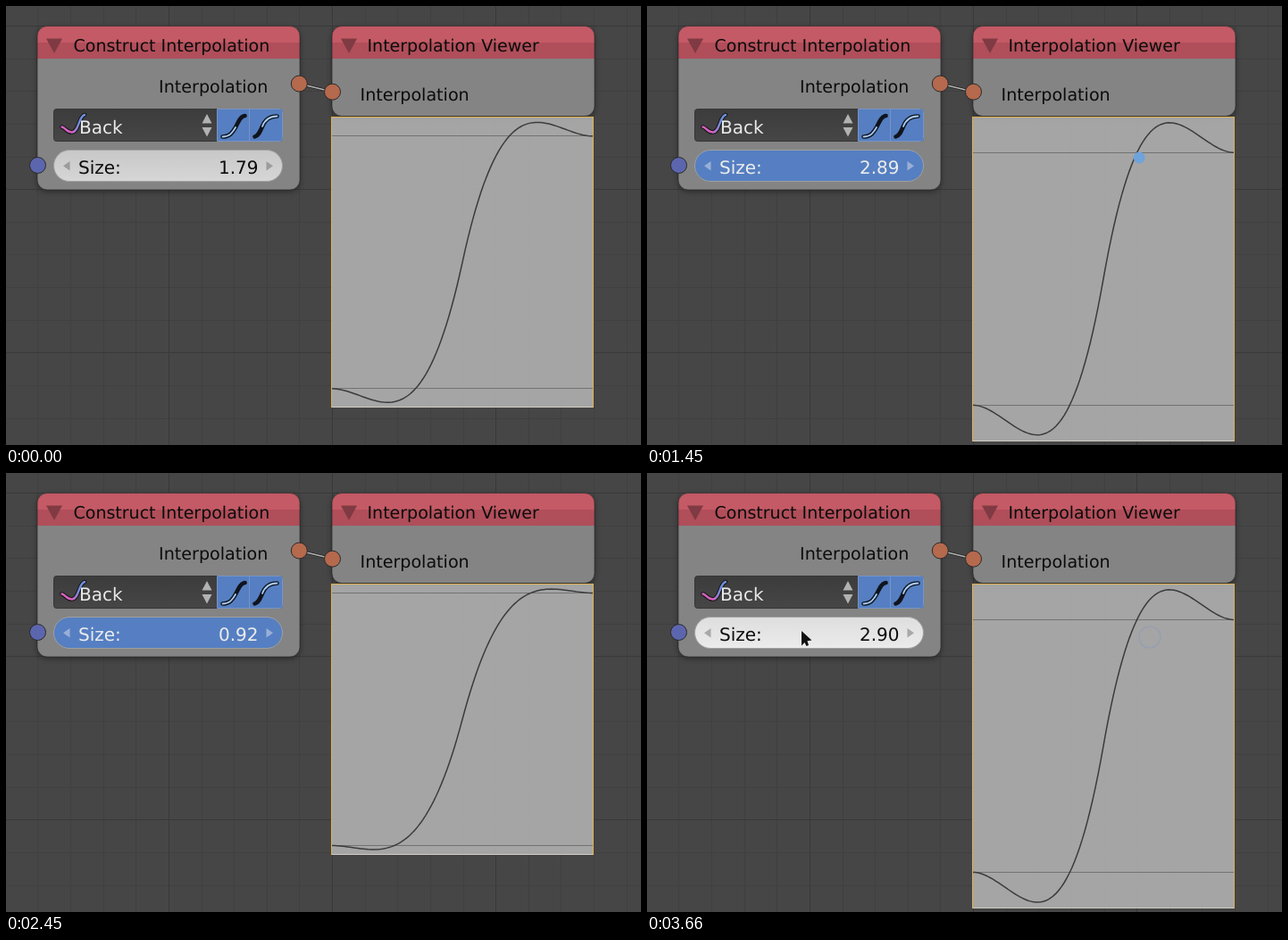
Animation, 711 px wide and 492 px high, one loop 3.7 s. Source, as an HTML page:

```html
<!DOCTYPE html>
<html lang="en">
<head>
<meta charset="utf-8">
<title>Interpolation nodes</title>
<style>
html, body { margin: 0; width: 100%; height: 100%; overflow: hidden; background: #464646; }
svg { display: block; }
text { font-family: "DejaVu Sans", sans-serif; text-rendering: geometricPrecision; fill: #0c0c0c; }
.title { font-size: 19px; }
.label { font-size: 19.1px; }
.field { font-size: 20px; }
.crisp { shape-rendering: crispEdges; }
.icon path { fill: none; stroke-linecap: round; stroke-linejoin: round; }
.socket { stroke: #2a2a2a; stroke-width: 1; }
</style>
</head>
<body>
<svg width="711" height="492" viewBox="0 0 711 492">
  <defs>
    <linearGradient id="idle" x2="0" y2="1"><stop stop-color="#c8c8c8"/><stop offset="1" stop-color="#d6d6d6"/></linearGradient>
    <linearGradient id="hover" x2="0" y2="1"><stop stop-color="#dedede"/><stop offset="1" stop-color="#ebebeb"/></linearGradient>
    <linearGradient id="menu" x2="0" y2="1"><stop stop-color="#3c3c3c"/><stop offset="1" stop-color="#464646"/></linearGradient>
    <linearGradient id="back" x1="61" x2="89" y1="0" y2="0" gradientUnits="userSpaceOnUse">
      <stop offset=".45" stop-color="#d860c0"/><stop offset=".75" stop-color="#6f8fe0"/>
    </linearGradient>
    <filter id="blur" x="-10%" y="-10%" width="120%" height="125%"><feGaussianBlur stdDeviation="3"/></filter>
    <clipPath id="plot"><rect id="plotClip" x="364" y="124" width="294"/></clipPath>
  </defs>

  <g id="grid" class="crisp"></g>
  <g id="nodes"></g>

  <path d="M328 87L365 96" stroke="#222" stroke-width="3"/>
  <path d="M328 87L365 96" stroke="#b4b4b4" stroke-width="1.3"/>
  <g class="socket">
    <circle cx="328.3" cy="87" r="9" fill="#b5694d"/>
    <circle cx="365.5" cy="96.2" r="9" fill="#b5694d"/>
    <circle cx="35.5" cy="178.5" r="9" fill="#5c66ae"/>
  </g>
  <text class="title" x="75.5" y="51">Construct Interpolation</text>
  <text class="title" x="404.5" y="51">Interpolation Viewer</text>
  <text class="label" x="293.3" y="97" text-anchor="end">Interpolation</text>
  <text class="label" x="396.5" y="106">Interpolation</text>

  <rect x="53.5" y="115.5" width="256" height="36" rx="3" fill="url(#menu)" stroke="#363636"/>
  <path d="M236.5 115.5H306.5a3 3 0 0 1 3 3V148.5a3 3 0 0 1 -3 3H236.5Z" fill="#557fc2" stroke="#7894c6"/>
  <path class="crisp" d="M272.5 116V151" stroke="#7894c6"/>
  <path d="M219.5 131.5L225 121L230.5 131.5ZM219.5 136L225 146.5L230.5 136Z" fill="#b2b2b2"/>
  <g id="icons" class="icon"></g>
  <text class="field" x="82" y="143" style="fill:#e9e9e9">Back</text>

  <rect id="panel" x="364" y="124" width="294" fill="#b0b0b0" fill-opacity=".9" class="crisp"/>
  <g clip-path="url(#plot)">
    <path id="levels" class="crisp" stroke="#727272"/>
    <path id="curve" fill="none" stroke="#3b3b3b" stroke-width="1.5"/>
  </g>
  <path id="base" class="crisp" stroke="#d0ccc2"/>
  <path id="frame" class="crisp" fill="none" stroke="#dfb04e"/>
  <circle id="dot" r="6.5"/>
  <circle id="ring" fill="none" stroke="#7f97c6" stroke-width="1.2"/>

  <rect id="slider" x="53.5" y="161.5" width="256" height="35" rx="17.5" stroke="#a0a0a0"/>
  <path id="arrows" d="M64 179.3L71.5 174V184.6ZM299 179.3L291.5 174V184.6Z"/>
  <text class="field caption" x="81" y="188">Size:</text>
  <text class="field caption" id="value" x="282.5" y="188" text-anchor="end"></text>
  <path id="cursor" d="M173 177L184.5 187.5L179.5 188.3L181 193L178.5 194L176.5 190L173 193.5Z" fill="#111" stroke="#f4f4f4" stroke-width=".8" paint-order="stroke"/>
</svg>
<script>
const LOOP = 3700, HOVER = 260, PRESS = 550, RELEASE = 3410, END = 3660;

// Bursts of evenly spaced refreshes: start, end, intervals
const BURSTS = [[0, HOVER, 1], [PRESS, 1040, 7], [1120, 1640, 7], [1720, 2200, 6],
  [2290, 2780, 7], [2860, 3030, 2], [RELEASE, END, 6]];

// Turning points of the drag: time, size, pointer x, pointer y
const DRAG = [
  [PRESS, 1.79, 173, 180], [1120, 2.16, 368, 170], [1610, 3.2, 618, 170], [1880, 2.44, 342, 166],
  [2220, .7, 95, 172], [2430, .92, 190, 178], [2860, 2.82, 545, 185], [3030, 2.9, 563, 184]];

const $ = id => document.getElementById(id);
const set = (id, attrs) => { for (const k in attrs) $(id).setAttribute(k, attrs[k]); };
const show = (id, on) => { $(id).style.display = on ? "" : "none"; };

function lastRefresh(t) {
  const [from, to, n] = BURSTS.filter(b => b[0] <= t).pop();
  const step = (to - from) / n;
  return Math.min(to, from + Math.floor((t - from) / step + 1e-6) * step);
}

// Smooth curve through the turning points that never overshoots them
function dragAt(t, col) {
  const last = DRAG.length - 1;
  if (t <= DRAG[0][0]) return DRAG[0][col];
  if (t >= DRAG[last][0]) return DRAG[last][col];
  const i = DRAG.findIndex(k => k[0] > t) - 1;
  const slope = j => (DRAG[j + 1][col] - DRAG[j][col]) / (DRAG[j + 1][0] - DRAG[j][0]);
  const tangent = j => {
    if (j === 0 || j === last) return 0;
    const a = slope(j - 1), b = slope(j);
    return a * b > 0 ? 2 * a * b / (a + b) : 0;
  };
  const span = DRAG[i + 1][0] - DRAG[i][0], p = (t - DRAG[i][0]) / span, q = 1 - p;
  return DRAG[i][col] * q * q * (1 + 2 * p) + DRAG[i + 1][col] * p * p * (1 + 2 * q) +
    span * p * q * (tangent(i) * q - tangent(i + 1) * p);
}

function drawGrid() {
  const gap = 36.63, lines = ["", ""];
  for (let i = -1; i < 20; i++) {
    const x = Math.round(35.4 + i * gap) + .5, y = Math.round(22 + i * gap) + .5;
    lines[+((i + 1) % 5 === 0)] += `M${x} 0V492`;
    lines[+(i % 5 === 0)] += `M0 ${y}H711`;
  }
  $("grid").innerHTML = ["#404040", "#393939"]
    .map((c, i) => `<path d="${lines[i]}" stroke="${c}"/>`).join("");
}

function node(x, bottom) {
  const y = 22.5, w = 294, r = 11;
  const cap = `M${x} 41V${y + r}a${r} ${r} 0 0 1 ${r} ${-r}h${w - 2 * r}a${r} ${r} 0 0 1 ${r} ${r}V41Z`;
  const box = `x="${x}" y="${y}" width="${w}" height="${bottom - y}" rx="${r}"`;
  return `<rect ${box} opacity=".4" filter="url(#blur)" transform="translate(0 2)"/>
    <rect ${box} fill="#848484"/>
    <path d="${cap}" fill="#c45a65"/>
    <path d="M${x} 41h${w}V59h${-w}Z" fill="#b04e5a"/>
    <rect ${box} fill="none" stroke="#262626" stroke-opacity=".65"/>
    <path d="M${x + 10} 36.5h18l-9 16.5Z" fill="#7f3a43"/>`;
}

function drawIcons() {
  const stroke = (d, color, width) => `<path d="${d}" stroke="${color}" stroke-width="${width}"/>`;
  const ink = "#10141c", pale = "#a9cbf5";
  const back = "M62.5 135.500C66 136 68 142 74 141.500C82 140.500 81 124 88 122";
  const easeIn = "M242.500 146.500C250 146.500 253 143 257 136", inRest = "C261 128 263 123.500 267.500 123";
  const easeOut = "M278.500 146.500C282 146 284 142 287 135", outTop = "M287 135C290 127 296 123.500 303.500 123.500";
  $("icons").innerHTML = stroke(back, "#151515", 4.6) + stroke(back, "url(#back)", 2.4) +
    stroke(easeIn + inRest, ink, 4.6) + stroke(easeIn, pale, 1.8) +
    stroke(easeOut, ink, 4.6) + stroke(outTop, ink, 4.6) + stroke(outTop, pale, 1.8);
}

const backIn = (x, s) => x * x * ((s + 1) * x - s);
const backInOut = (x, s) => x < .5 ? backIn(2 * x, s) / 2 : 1 - backIn(2 - 2 * x, s) / 2;

function drawPlot(s) {
  const unit = 283, left = 364.5, width = 293;
  const over = 4 * s ** 3 / (27 * (s + 1) ** 2);
  const one = 130 + 3.5 * over + unit * over / 2, zero = one + unit;
  const snap = y => Math.floor(y) + .5;
  const bottom = snap(417.9 + 293 * over);
  const points = Array.from({ length: 101 }, (_, i) =>
    `${(left + width * i / 100).toFixed(2)} ${(zero - unit * backInOut(i / 100, s)).toFixed(2)}`);
  set("curve", { d: "M" + points.join("L") });
  set("levels", { d: `M364 ${snap(one)}H658M364 ${snap(zero)}H658` });
  for (const id of ["panel", "plotClip"]) set(id, { height: bottom - 123.5 });
  set("base", { d: `M364 ${bottom}H658` });
  set("frame", { d: `M364.5 ${bottom}V124.5H657.5V${bottom}` });
}

const LOOKS = {
  idle: { fill: "url(#idle)", arrow: "#9c9c9c", text: "#0c0c0c" },
  hover: { fill: "url(#hover)", arrow: "#a8a8a8", text: "#0c0c0c" },
  drag: { fill: "#557fc2", arrow: "#9aafd6", text: "#ececec" }
};

function drawSlider(state, s) {
  const look = LOOKS[state];
  set("slider", { fill: look.fill });
  set("arrows", { fill: look.arrow });
  document.querySelectorAll(".caption").forEach(el => { el.style.fill = look.text; });
  $("value").textContent = s.toFixed(2);
  show("cursor", state === "hover");
}

function draw(t) {
  const [s, x, y] = [1, 2, 3].map(col => dragAt(t, col));
  const dragging = t >= PRESS && t < RELEASE;
  drawPlot(s);
  drawSlider(dragging ? "drag" : t < HOVER ? "idle" : "hover", s);
  show("dot", dragging);
  set("dot", { cx: x, cy: y, fill: x > 358 ? "#6fa3db" : "#5b68ae" });
  show("ring", t >= RELEASE);
  const p = Math.max(0, (t - RELEASE) / (END - RELEASE));
  set("ring", { cx: x, cy: y, r: 6.5 + 5.5 * p, opacity: 1 - .5 * p });
}

drawGrid();
$("nodes").innerHTML = node(35, 206) + node(365, 123.5);
drawIcons();

const start = performance.now();
function tick() {
  draw(lastRefresh((performance.now() - start) % LOOP));
  requestAnimationFrame(tick);
}
tick();
</script>
</body>
</html>
```
